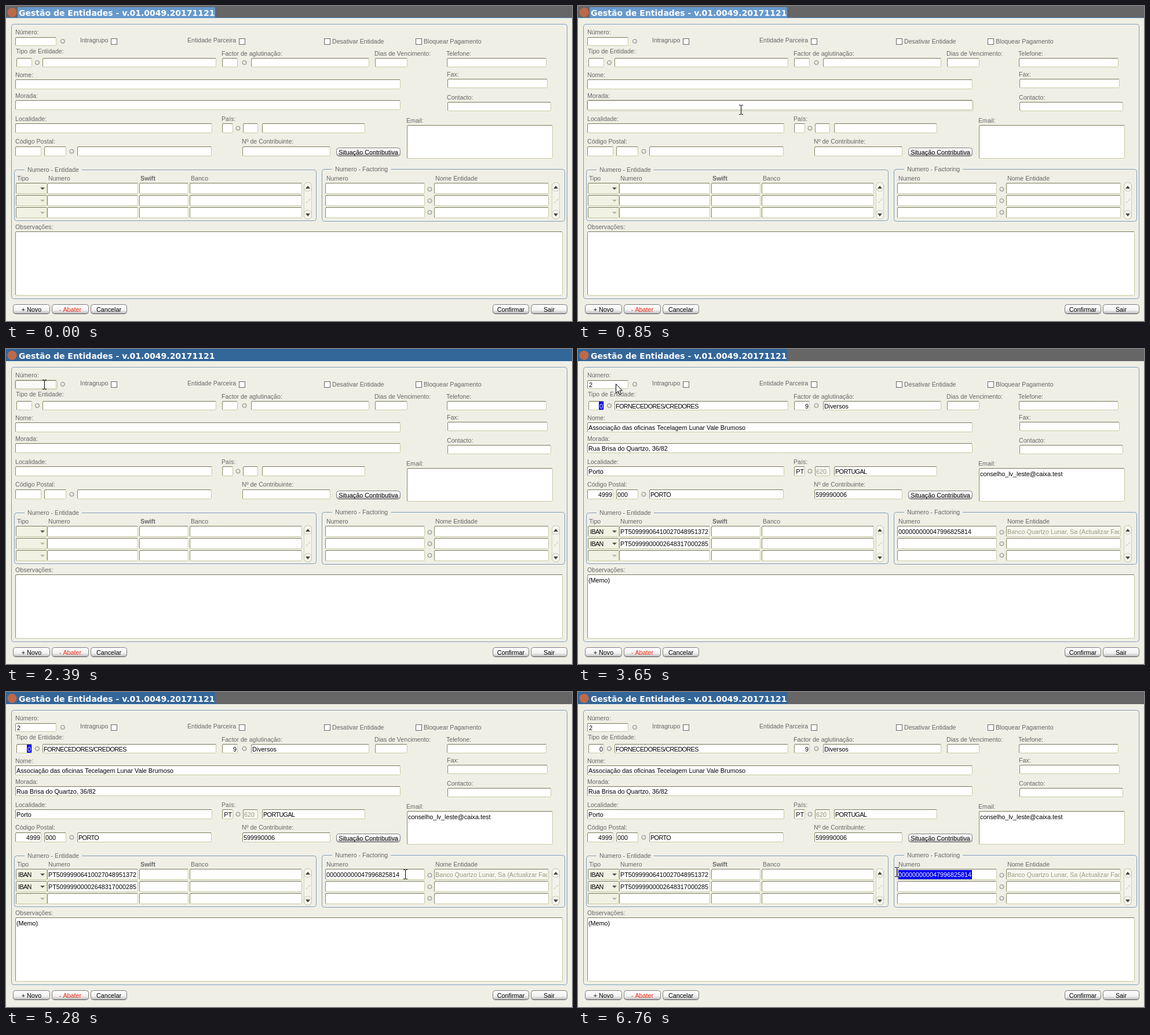
An HTML page with a canvas for the animation above (8000 ms loop, 977 by 545 pixels).

```html
<!DOCTYPE html>
<html lang="pt">
<head>
<meta charset="utf-8">
<title>Gestão de Entidades</title>
<style>
html, body { margin: 0; width: 100%; height: 100%; overflow: hidden; background: #f0efe6; }
canvas { display: block; }
</style>
</head>
<body>
<canvas id="stage" width="977" height="545"></canvas>
<script>
const ctx = document.getElementById('stage').getContext('2d');
const LOOP = 8000;
const SANS = '"Liberation Sans", Arial, sans-serif';
const LABEL = '10.6px ' + SANS;
const VALUE = '10.8px ' + SANS;
const BOLD = 'bold 10.8px ' + SANS;
const TITLE = 'bold 14px "DejaVu Sans", Verdana, sans-serif';
const PAPER = '#f0efe6', GREY = '#666666', DARK = '#336699', SELECT = '#0000f0';
const ACCOUNT = '000000000047996825814';

// Times of the interactions
const FOCUS = 1780, BLINK = 2390, TYPED = 3020, BUSY = 3570, LOADED = 3650,
      MOVE = 4500, CLICK = 5970, DRAG = 6130;

// ---- Pointer: each move runs from the last place to x, y in n held steps
const moves = [
  { at: 220, gap: 85, n: 3, x: 330, y: 455 },
  { at: 628, gap: 74, n: 10, x: 66, y: 61, ease: [1.84, 2.36] },
  { at: BUSY, gap: 80, n: 1, x: 65, y: 60 },
  { at: MOVE, gap: 76.5, n: 11, x: 689, y: 315, ease: [1.21, 2.45] },
  { at: 5360, gap: 60, n: 2, x: 700, y: 318 },
  { at: CLICK, gap: 80, n: 1, x: 697, y: 316 },
  { at: DRAG, gap: 78.7, n: 9, x: 550, y: 311, ease: [.885, 1] }
];

function pointer(t) {
  if (t < moves[0].at) return null;
  let from = { x: 352, y: 535 };
  for (const m of moves) {
    const k = Math.floor((t - m.at) / m.gap) + 1;
    if (k < 1) break;
    const p = Math.min(k / m.n, 1);
    const [ex, ey] = m.ease || [1, 1];
    from = {
      x: from.x + (m.x - from.x) * p ** ex,
      y: from.y + (m.y - from.y) * (1 - (1 - p) ** ey)
    };
  }
  return { x: Math.round(from.x), y: Math.round(from.y) };
}

// ---- Drawing helpers
function rect(x, y, w, h, color) {
  ctx.fillStyle = color;
  ctx.fillRect(x, y, w, h);
}

function round(x, y, w, h, r, stroke, fill) {
  ctx.beginPath();
  ctx.roundRect(x + .5, y + .5, w - 1, h - 1, r);
  if (fill) { ctx.fillStyle = fill; ctx.fill(); }
  ctx.strokeStyle = stroke;
  ctx.lineWidth = 1;
  ctx.stroke();
}

function poly(pts, fill, stroke) {
  ctx.beginPath();
  pts.forEach(([x, y]) => ctx.lineTo(x, y));
  ctx.closePath();
  ctx.fillStyle = fill;
  ctx.fill();
  if (stroke) { ctx.strokeStyle = stroke; ctx.lineWidth = 1; ctx.stroke(); }
}

function triangle(x, y, size, color) {
  poly([[x - 4, y - size / 2], [x + 4, y - size / 2], [x, y + size / 2]], color);
}

function clipped(x, y, w, h, paint) {
  ctx.save();
  ctx.beginPath();
  ctx.rect(x, y, w, h);
  ctx.clip();
  paint();
  ctx.restore();
}

// y is the middle of the capitals
function text(s, x, y, font = VALUE, color = '#000', align = 'left') {
  ctx.font = font;
  ctx.letterSpacing = /^[A-Z\/]{3,}$/.test(s) ? '-0.6px' : '0px';
  ctx.textAlign = align;
  ctx.fillStyle = color;
  ctx.fillText(s, x, y + 4);
}

function lens(x, y) {
  ctx.beginPath();
  ctx.arc(x, y, 3.5, 0, 7);
  ctx.fillStyle = '#e4e4e0';
  ctx.fill();
  ctx.strokeStyle = '#85857d';
  ctx.lineWidth = 1;
  ctx.stroke();
  rect(x - 2, y - 2, 2, 2, '#fff');
}

function field({ x, y, w, h }, fill = '#fff') {
  round(x, y, w, h, 2, '#c6cba0', fill);
  rect(x + 1, y, w - 2, 1, '#77775a');
  rect(x, y + 1, 1, h - 2, '#8a8a64');
}

// ---- Form content
const cells = [], labels = [], lenses = [];

function cell(x, y, w, h, value = '', more) {
  const c = { x, y, w, h, value, ...more };
  cells.push(c);
  return c;
}

// A label over one or more boxes; a lens fills each wide gap between boxes
function entry(label, y, h, boxes, drop = 8) {
  labels.push([label, Math.max(16, boxes[0][0] - 1), y - drop]);
  let end = 0;
  return boxes.map(([x, w, value, off], i) => {
    if (i && x - end > 10) lenses.push([(x + end) / 2, y + h / 2]);
    end = x + w;
    return cell(x, y, w, h, value, { off, right: !i && w < 50 });
  });
}

const [number] = entry('Número:', 54, 15, [[16, 71]], 9);
lenses.push([98, 61]);
const [kind] = entry('Tipo de Entidade:', 90, 16, [[18, 27, '0'], [63, 300, 'FORNECEDORES/CREDORES']], 12);
entry('Factor de aglutinação:', 90, 16, [[373, 27, '9'], [423, 204, 'Diversos']]);
entry('Dias de Vencimento:', 90, 16, [[637, 56]]);
entry('Telefone:', 90, 16, [[761, 172]]);
entry('Nome:', 127, 17, [[16, 665, 'Associação das oficinas Tecelagem Lunar Vale Brumoso']]);
entry('Fax:', 126, 16, [[762, 173]]);
entry('Morada:', 163, 17, [[16, 665, 'Rua Brisa do Quartzo, 36/82']]);
entry('Contacto:', 166, 16, [[762, 179]]);
entry('Localidade:', 203, 17, [[16, 340, 'Porto']]);
entry('País:', 203, 17, [[373, 19, 'PT'], [409, 26, '620', true], [442, 178, 'PORTUGAL']]);
entry('Email:', 206, 58, [[692, 252, 'conselho_lv_leste@caixa.test']]);
entry('Código Postal:', 243, 17, [[16, 45, '4999'], [66, 38, '000'], [123, 232, 'PORTO']], 9);
entry('Nº de Contribuinte:', 243, 17, [[408, 152, '599990006']], 9);
entry('Observações:', 390, 111, [[16, 945, '(Memo)']]);

const columns = [
  ['Tipo', 17, 54], ['Numero', 71, 157], ['Swift', 230, 85], ['Banco', 317, 194],
  ['Numero', 551, 172], ['Nome Entidade', 739, 198]
];
const rows = [
  ['IBAN', 'PT50999906410027048951372', '', '', ACCOUNT, 'Banco Quartzo Lunar, Sa (Actualizar Factoring)'],
  ['IBAN', 'PT50999900002648317000285'],
  []
];
rows.forEach((row, r) => {
  const y = 306 + 21 * r;
  columns.forEach(([, x, w], c) => cell(x, y, w, 19, row[c], { combo: !c, row: r, off: c === 5 && !r }));
  lenses.push([731.5, 317 + 20 * r]);
});

const middle = c => c.y + Math.round(Math.min(c.h, 19) / 2 + .5);

function drawCell(c, loaded) {
  const off = c.off && loaded;
  field(c, c.combo ? '#f1f1e4' : off ? '#f7f7f0' : '#fff');
  if (c.combo) {
    const ready = c.row < (loaded ? 2 : 1);
    triangle(c.x + 46, c.y + 10, 4, ready ? '#55554a' : '#b8b8a8');
  }
  if (!loaded || !c.value) return;
  const x = c.right ? c.x + c.w - 2 : c.x + (c.combo ? 4 : 2);
  clipped(c.x + 1, c.y, c.w - 3, c.h, () =>
    text(c.value, x, middle(c), VALUE, off ? '#99997f' : '#000', c.right ? 'right' : 'left'));
}

function button(s, x, w, y = 516, h = 17, color = '#000') {
  const g = ctx.createLinearGradient(0, y, 0, y + h);
  g.addColorStop(0, '#ffffff');
  g.addColorStop(.6, '#f2f2f2');
  g.addColorStop(1, '#b0b0b0');
  round(x, y, w, h, 4, '#7c7c7c', g);
  rect(x + 4, y + h - 1, w - 8, 1, '#555');
  text(s, x + w / 2, y + Math.round(h / 2), VALUE, color, 'center');
}

function checkbox(s, x, boxFirst) {
  ctx.font = LABEL;
  const bx = boxFirst ? x : Math.round(x + ctx.measureText(s).width + 5);
  rect(bx, 56, 11, 11, GREY);
  rect(bx + 1, 57, 9, 9, '#fff');
  text(s, boxFirst ? x + 14 : x, boxFirst ? 61 : 59, LABEL, GREY);
}

function group(x, y, w, h, title) {
  round(x, y, w, h, 4, '#7f9db9');
  if (!title) return;
  ctx.font = LABEL;
  rect(x + 18, y - 1, ctx.measureText(title).width + 10, 3, PAPER);
  text(title, x + 23, y, LABEL, GREY);
}

function scrollbar(x) {
  round(x, 305, 14, 64, 6, '#d0d0c0', '#f5f4ec');
  for (const [y, size] of [[305, -5], [353, 5]]) {
    round(x, y, 14, 16, 6, '#c2c2a8', '#f8f8f0');
    triangle(x + 7, y + 8.5, size, '#444');
  }
  ctx.strokeStyle = '#b5b5a5';
  ctx.beginPath();
  for (const d of [0, 4]) {
    ctx.moveTo(x + 4 + d, 341 - d);
    ctx.lineTo(x + 7 + d, 338 - d);
  }
  ctx.stroke();
}

function titleBar(t) {
  rect(0, 0, 977, 21, t >= FOCUS && t < BUSY ? DARK : GREY);
  if (t < FOCUS) {
    rect(20, 2, 341, 18, '#6699cc');
    rect(0, 20, 977, 1, '#6699cc');
  } else {
    rect(0, 0, 361, 21, DARK);
  }
  ctx.beginPath();
  ctx.arc(10.5, 11, 8, 0, 7);
  ctx.fillStyle = '#bd6a4a';
  ctx.fill();
  text('Gestão de Entidades - v.01.0049.20171121', 22, 13, TITLE, '#fff');
}

function form(loaded) {
  group(9, 31, 960, 476);
  group(14, 283, 522, 89, 'Numero - Entidade');
  group(545, 282, 420, 91, 'Numero - Factoring');
  labels.forEach(([s, x, y]) => text(s, x, y, LABEL, GREY));
  columns.forEach(([s, x]) => text(s, x + 2, 298, s === 'Swift' ? BOLD : LABEL, GREY));
  checkbox('Intragrupo', 128);
  checkbox('Entidade Parceira', 313);
  checkbox('Desativar Entidade', 549, true);
  checkbox('Bloquear Pagamento', 707, true);
  cells.forEach(c => drawCell(c, loaded));
  lenses.forEach(([x, y]) => lens(x, y));
  scrollbar(514);
  scrollbar(942);
  button('+ Novo', 12, 64);
  button('- Abater', 79, 64, 516, 17, '#f02810');
  button('Cancelar', 146, 63);
  button('Confirmar', 840, 63);
  button('Sair', 906, 63);
  button('Situação Contributiva', 570, 111, 245, 15);
}

// White text on blue over part of a line
function highlight(s, textX, x, y, w, h, mid) {
  clipped(x, y, w, h, () => {
    rect(x, y, w, h, SELECT);
    text(s, textX, mid, VALUE, '#fff');
  });
}

function selection(t, p) {
  if (t < CLICK) highlight('0', 37, 36, 91, 8, 14, middle(kind));
  else if (t < DRAG) rect(680, 309, 1, 14, '#000');
  else {
    const x = 553 + 6 * Math.max(0, Math.floor((p.x - 553) / 6));
    highlight(ACCOUNT, 553, x, 308, 680 - x, 16, 316);
  }
}

function beam({ x, y }, color) {
  rect(x, y - 7, 1, 15, color);
  for (const d of [-8, 8]) {
    rect(x - 3, y + d, 3, 1, color);
    rect(x + 1, y + d, 3, 1, color);
  }
}

function arrow({ x, y }) {
  const shape = [[0, 0], [0, 16], [4, 12.5], [6.5, 18.5], [9, 17.5], [6.5, 11.5], [11, 11.5]];
  poly(shape.map(([a, b]) => [x + a + .5, y + b + .5]), '#fff', '#000');
}

function draw(t) {
  const p = pointer(t);
  const over = p && cells.find(c => p.x >= c.x && p.x < c.x + c.w && p.y >= c.y && p.y < c.y + c.h);
  const waiting = t >= BUSY && t < MOVE || t >= CLICK && t < DRAG;

  rect(0, 0, 977, 545, PAPER);
  titleBar(t);
  form(t >= LOADED);
  if (over && t < BUSY) round(over.x - 1, over.y - 1, over.w + 3, over.h + 3, 3, '#cfcdbd');
  if (t >= FOCUS && t < BUSY) field(number, '#fafaf8');
  if (t >= TYPED) text('2', 19, middle(number));
  if (t >= FOCUS && t < BLINK) rect(19, 55, 1, 13, '#000');
  if (t >= TYPED && t < BUSY) rect(25, 55, 1, 13, '#000');
  if (t >= LOADED) selection(t, p);
  if (!p) return;
  if (waiting || !over && t < DRAG) arrow(p);
  else beam(p, t >= DRAG && p.x > 553 ? '#ffff40' : '#000');
}

const begin = performance.now();
function tick() {
  draw((performance.now() - begin) % LOOP);
  requestAnimationFrame(tick);
}
draw(0);
requestAnimationFrame(tick);
</script>
</body>
</html>
```
